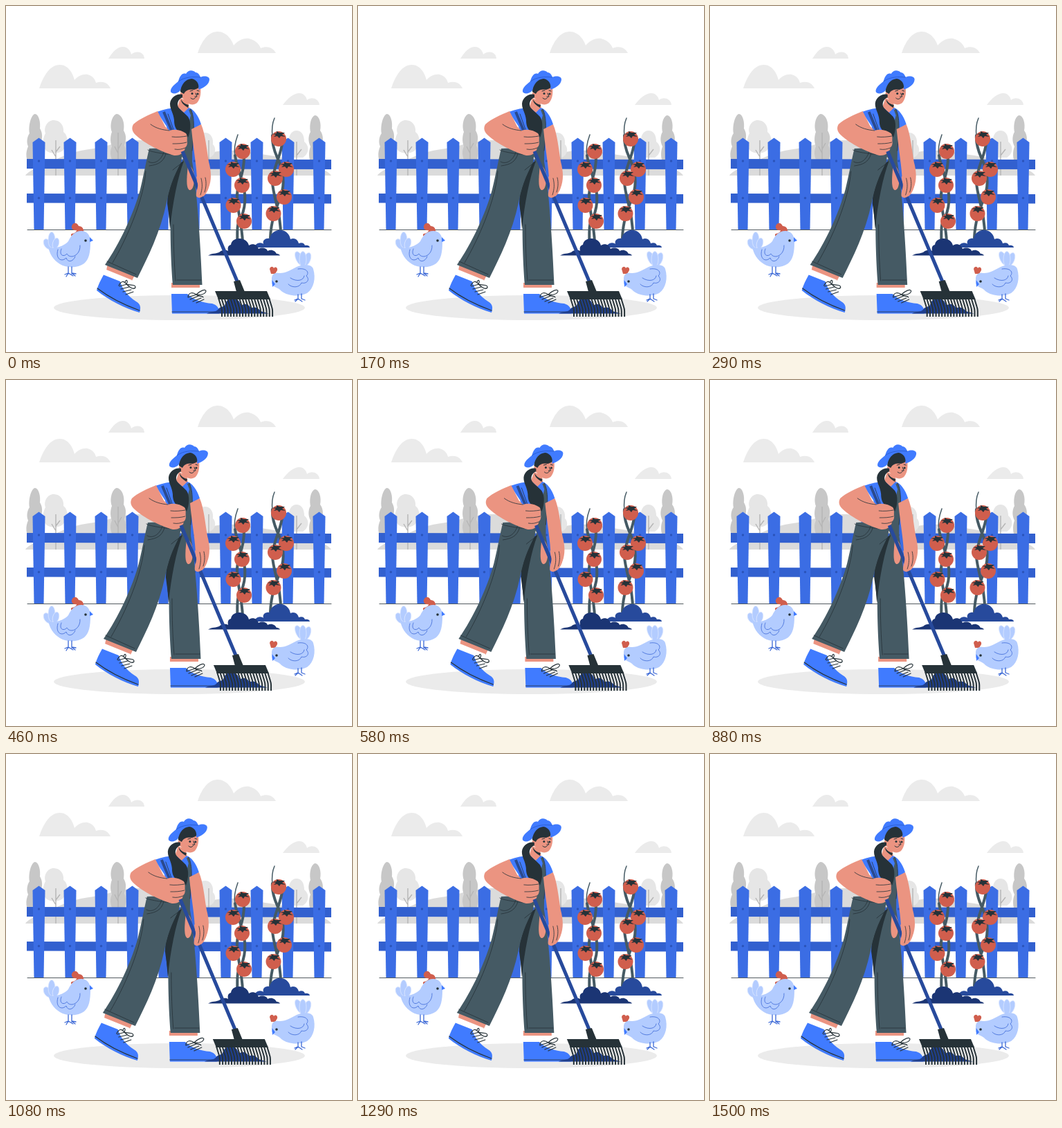
Write an HTML page that moves like this. It is 500 px wide and 500 px high and loops after 1.54 s.

```html
<!DOCTYPE html>
<html lang="en">
<head>
<meta charset="utf-8">
<title>Gardener with a rake</title>
<style>
html, body { margin: 0; width: 100%; height: 100%; overflow: hidden; background: #fff; }
svg { display: block; width: 100vw; height: 100vh; }
.line { fill: none; stroke: #263238; stroke-width: .8; stroke-linecap: round; stroke-linejoin: round; }
.dark { fill: #263238; }
.skin { fill: #eb9481; }
.denim { fill: #455a64; }
.blue { fill: #407bff; }
.red { fill: #d05e4d; }
.hen { fill: #b3ccff; }
.quill { fill: none; stroke: #3b68d6; stroke-width: .8; stroke-linecap: round; }
.stem { fill: none; stroke: #455a64; stroke-width: 4; stroke-linecap: round; }
</style>
</head>
<body>
<svg viewBox="0 0 500 500">
  <g fill="#ebebeb">
    <path d="M48 119C53 104 62 85 78 85C90 85 97 98 99 107C104 101 111 98 118 99C126 101 129 107 130 111C139 108 147 110 151 119Z"/>
    <path d="M277 68C282 53 291 37 306 37C319 37 327 50 329 57C335 50 343 46 351 47C360 49 366 55 368 61C377 57 386 60 390 68Z"/>
    <path d="M148 76C154 66 161 59 169 59C176 59 180 65 181 70C186 65 199 64 200 76Z"/>
    <path d="M400 143C407 133 416 126 424 126C430 126 434 131 435 136C440 131 452 133 453 143Z"/>
  </g>
  <path fill="#dbdbdb" d="M28 245C34 236 58 229 78 219C100 209 118 207 135 205C158 198 184 190 213 196C250 201 270 216 300 211C330 205 355 212 382 216C420 222 464 234 470 245Z"/>
  <g fill="#e6e6e6">
    <path d="M69 165C79 165 84 174 83 182C91 188 90 202 82 209C76 214 62 214 57 208C51 201 54 189 57 184C54 175 60 165 69 165Z"/>
    <path d="M288 183C297 183 300 193 299 200C305 206 302 217 294 219H280V184Z"/>
    <path d="M420 180C429 180 431 190 431 196C439 202 438 214 429 219H411C404 212 404 202 409 197C408 188 412 180 420 180Z"/>
  </g>
  <g fill="#c7c7c7">
    <path d="M42 156C48 157 50 169 49 177C54 185 52 193 50 199C54 210 51 225 44 234H36C28 222 28 212 32 203C29 196 31 188 34 184C32 174 36 157 42 156Z"/>
    <path d="M160 156C168 157 172 169 170 180C175 188 173 196 171 201C176 212 172 224 167 230H158C151 222 149 211 153 203C150 195 151 187 153 182C149 171 154 157 160 156Z"/>
    <path d="M447 158C453 159 456 170 454 180C460 188 458 198 455 203C459 213 455 225 450 232H443C437 222 437 211 440 203C436 195 437 187 440 182C438 171 441 159 447 158Z"/>
  </g>
  <path fill="none" stroke="#b5b5b5" stroke-width="1.4" d="M72 245V194M72 218L66 208M72 211L78 203M162 245V183M162 213L157 203M162 207L167 198M293 222V194M420 245V196M420 216L427 207"/>
  <path fill="#3260cf" d="M30 221L470 222V236L30 235ZM30 271L470 272V285.500L30 284.500Z"/>
  <g id="fence"></g>
  <path class="line" d="M31 323.500H470" stroke-width=".6"/>

  <g id="vines">
    <path class="stem" d="M331 216C333 230 338 241 340 249C348 272 347 294 336 313C333 322 335 332 334 342M344 215C345 245 332 258 334 280C335 298 341 315 342 342"/>
    <path class="stem" d="M385 187C384 200 388 210 392 219C402 240 403 258 397 275C390 293 383 310 382 335M399 198C398 215 385 235 385 255C386 276 398 300 397 335"/>
    <path class="stem" d="M335 186C331 197 329 207 331 216M388 162C384 171 384 180 385 189" style="stroke-width:1.5"/>
  </g>
  <g id="tomatoes"></g>
  <path fill="#274a9c" d="M343 349C350 346 356 347 360 346C364 341 370 342 372 344C370 338 376 335 381 336C383 327 391 323 398 324C406 325 410 331 411 337C417 334 422 338 423 343C428 341 431 343 432 346C436 345 439 347 439 349Z"/>
  <path fill="#1b3574" d="M292 360.500C298 357 304 358 308 356C312 352 318 352 321 354C320 349 321 346 325 345C326 338 332 336 338 336C346 337 350 341 351 346C357 342 363 345 365 351C370 348 377 350 378 354C384 351 389 354 391 358C394 358 396 360 396 360.500Z"/>

  <g id="left-hen">
    <g class="hen" stroke="#dce7ff" stroke-width=".8">
      <ellipse cx="60" cy="344" rx="5" ry="8" transform="rotate(-30 60 344)"/>
      <ellipse cx="66" cy="338" rx="5" ry="11.500"/>
      <ellipse cx="72" cy="343" rx="4.500" ry="8" transform="rotate(15 72 343)"/>
    </g>
    <path class="red" d="M95 318C97 312 103 313 105 318C110 318 113 322 112 327C108 326 104 330 100 333C96 336 92 331 95 329C99 329 102 326 102 324C98 325 94 322 95 318Z"/>
    <path class="hen" d="M61 348C70 352 84 347 90 340C94 332 99 325 109 325C117 325 122 331 122 341C122 356 120 366 113 372C104 379 88 379 78 373C68 367 63 358 61 348Z"/>
    <path class="blue" d="M121 334L126 339L121 341Z"/>
    <circle class="dark" cx="115" cy="339" r="1.800"/>
    <path class="quill" d="M75 352C71 365 80 371 87 364C89 371 97 370 100 362M80 351C76 361 84 363 88 358C93 367 108 360 107 346"/>
    <path class="quill" stroke-width="1.300" style="stroke-width:1.3" d="M90 377V387M95 377V387M85 388L90 386L97 390M90 386L87 391M95 386L101 387M95 386L100 390"/>
  </g>
  <g id="right-hen">
    <g class="hen" stroke="#dce7ff" stroke-width=".8">
      <ellipse cx="424" cy="365" rx="5" ry="11" transform="rotate(-25 424 365)"/>
      <ellipse cx="435" cy="366" rx="5" ry="10" transform="rotate(20 435 366)"/>
      <ellipse cx="429" cy="366" rx="5" ry="11.500"/>
    </g>
    <path class="red" d="M381 380C382 376 386 376 387 379C389 376 393 378 392 382L389 387H383Z"/>
    <path class="hen" d="M384 394C384 388 388 385 394 386C403 387 412 381 420 377C430 373 442 373 444 380C448 393 445 408 435 415C423 421 407 419 398 412C393 406 386 407 384 401Z"/>
    <path class="blue" d="M384.500 396L389 402L385 406Z"/>
    <circle class="dark" cx="391" cy="398" r="1.800"/>
    <path class="quill" d="M422 380C434 378 439 385 434 390C440 396 434 402 427 400C424 408 412 407 408 402M431 390C430 397 420 399 411 393"/>
    <path class="quill" style="stroke-width:1.3" d="M422 417V424M427 416V423M417 425L422 423L428 427M422 423L418 427M427 423L432 425"/>
  </g>

  <ellipse cx="250.500" cy="436" rx="181.500" ry="18" fill="#ebebeb"/>

  <g id="gardener">
    <g id="shoes">
      <path class="skin" d="M147 372L186 389L182 397L145 382Z"/>
      <path fill="#fff" d="M145 381L182 396L175 408L141 391Z"/>
      <path class="blue" d="M141 388.500L165 398C168 409 176 419 188 427C195 431 195 436 193 443C172 437 148 425 131 411C133 403 137 396 141 388.500Z"/>
      <path class="line" d="M132 408C149 421 171 432 193 440M163 404C166 398 170 396 174 402C180 404 188 402 187 407C183 411 178 405 174 402C177 396 173 394 172 400M164 405L175 402M166 409L178 406M169 413L181 410M173 417L184 413" style="stroke-width:1.2"/>
      <path class="skin" d="M239 400H280V407H239Z"/>
      <path fill="#fff" d="M239 407H278L276 418H239Z"/>
      <path class="blue" d="M239 416H262C270 424 284 429 298 430C305 432 309 437 308 444.500H240Z"/>
      <path class="line" d="M240 442H307"/>
      <path class="line" style="stroke-width:1.2" d="M263 420C264 414 270 413 275 417C280 412 288 408 289 412C288 417 280 418 275 417C279 421 284 418 285 421M263 421L275 417M266 424L278 419M270 427L282 422M275 429L286 424"/>
    </g>

    <path class="dark" d="M236 232L252 225L248 275L238 322L233 285Z"/>
    <path class="denim" d="M207 206C203 222 200 240 194 265C185 299 164 344 143 374L190 393C205 363 223 327 232 284C236 263 243 247 253 226L256 204Z"/>
    <path class="denim" d="M238 185L270 160L269 225C274 252 280 318 283.500 403H241C238 367 237 320 238 291C240 268 247 245 256 221Z"/>
    <path class="dark" d="M253 226C243 245 234 265 234 285L237 322C241 283 248 248 257 224Z"/>
    <path class="line" d="M205 208C212 212 232 214 255 216M206 225C215 230 225 222 228 211M207 231C220 229 227 226 231 214M247 396H282M146 369L188 388M242 316C242 345 243 370 245 397M202 239C199 281 174 337 154 371M241 237C247 232 251 229 256 226"/>

    <path class="skin" d="M252 133L263 138L266 153L254 157L246 150Z"/>
    <path class="blue" d="M218 153C228 149 239 147 249 147L257 154L264 147C271 149 278 158 282 171L269 180L267 208H239L232 174Z"/>
    <path class="denim" d="M239 189L244 180L262 178L267 158L264 150L267 149C273 161 272 184 268 218H239Z"/>
    <path fill="none" stroke="#2a4a8f" stroke-width="4" d="M228 153L241 184"/>
    <path class="line" d="M267 149C273 161 272 180 269 209M234 156L243 181"/>
    <path class="skin" d="M268 178L282 171C288 185 290 207 293 225C297 240 297 252 293 262C291 269 287 275 282 277C275 279 275 270 276 252C276 235 271 209 268 178Z"/>
    <path class="skin" d="M263 230C268 231 272 238 272 249C272 260 269 267 265 266C260 263 261 249 263 230Z"/>

    <path class="skin" d="M254 119L280 113C283 123 281 135 276 140C270 145 261 142 256 134C251 132 250 125 255 123Z"/>
    <path class="dark" d="M252 124C252 111 257 106 266 104L282 107C283 114 280 119 272 121C265 120 260 121 257 127ZM255 128C247 126 238 132 237 141C237 150 242 154 243 165C243 180 251 184 260 184L263 190C267 181 268 167 263 160C255 151 247 148 248 141C249 136 251 134 255 132ZM253 135C256 140 259 142 264 143L263 147C257 143 253 140 253 135Z"/>
    <path class="blue" d="M238 124C237 118 244 113 249 109C251 101 255 96 260 98C263 92 270 92 274 96C278 96 280 100 281 103C287 100 294 102 294 106C294 114 284 119 278 121C280 112 275 106 268 105C259 106 254 113 252 122C248 127 240 128 238 124Z"/>
    <path class="line" d="M249 109C259 102 270 102 281 103" stroke="#234caf" style="stroke:#2858c8"/>
    <circle class="dark" cx="269" cy="126.500" r="1.500"/>
    <circle class="dark" cx="277" cy="127" r="1.500"/>
    <path class="line" d="M266 123L270 122M276 122L279 123M274 126L276 131L273 131M267 133C270 136 273 134 274 132" style="stroke-width:1"/>

    <path class="skin" d="M219 152L230 174L236 180C246 177 254 180 260 184C263 189 261 193 262 197C262 202 260 203 259 205C258 211 252 217 243 216C225 211 201 199 188 187C182 182 181 176 184 171C191 164 207 157 219 152Z"/>
    <path class="line" d="M209 171C217 177 226 179 236 180M240 189C247 190 255 189 261 188M241 199C248 199 254 199 261 197M244 207C250 208 254 207 259 205"/>

    <path fill="none" stroke="#274a9c" stroke-width="5" d="M255 210L335 400"/>
    <path class="skin" d="M275 247C281 242 289 238 294 243C296 251 293 267 289 269C286 277 278 279 275 275C274 268 278 263 277 257Z"/>
    <path class="line" d="M282 249C284 257 284 264 281 273M288 248C290 256 289 263 287 269"/>

    <path fill="#1f3f8d" d="M290 444.500C296 441 302 443 306 439C309 434 314 435 316 433C318 424 325 421 331 423C338 425 338 430 340 433C346 428 352 432 354 437C360 433 366 438 368 441L380 444.500Z"/>
    <path class="dark" d="M329 398L338 396L345 413H333ZM302 412H377L382 424H307Z"/>
    <path id="tines" fill="none" stroke="#263238" stroke-width="2"/>
  </g>
</svg>
<script>
const byId = id => document.getElementById(id);

byId('fence').innerHTML = Array.from({ length: 10 }, (_, i) => `
  <g transform="translate(${47.5 + 45 * i})">
    <path fill="#3b6de4" d="M0 190.500L9 197L7 323H-7L-9 197Z"/>
    <g fill="#2b54ba"><circle cy="224" r="1.700"/><circle cy="277.500" r="1.700"/></g>
  </g>`).join('');

const tomatoes = [
  [342, 210], [328, 236], [341, 259], [328.5, 288], [344, 311],
  [394, 192], [405, 236], [389, 249], [402, 276], [386.5, 300]
];
byId('tomatoes').innerHTML = tomatoes.map(([x, y]) => `
  <g transform="translate(${x} ${y})">
    <circle class="red" r="11"/>
    <path class="dark" d="M-9-7L-3-8L-3-11L1-9L9-9L5-6L10-3L3-4L1-1L-2-4L-7-3L-4-6Z"/>
  </g>`).join('');

byId('tines').setAttribute('d', Array.from({ length: 18 }, (_, i) =>
  `M${307 + 4.3 * i} 422l4 13q1 3 1 6v8`).join(''));

// Sideways shake: offsets at every tenth of a 1.5 s cycle
const shake = [0, -1, 2, -4, 4, -4, 4, -4, 2, -1, 0];
const loop = 1540, steps = 37, cycle = 1500, lead = 25;

function offset(ms) {
  const p = (ms + lead) % cycle / cycle * 10, i = Math.floor(p);
  return shake[i] + (shake[i + 1] - shake[i]) * (p - i);
}

const gardener = byId('gardener'), rest = offset(0);

// The motion advances at 24 steps per second
function draw() {
  const step = Math.floor(performance.now() % loop / loop * steps);
  gardener.setAttribute('transform', `translate(${offset(step * 1000 / 24) - rest})`);
  requestAnimationFrame(draw);
}
draw();
</script>
</body>
</html>
```
